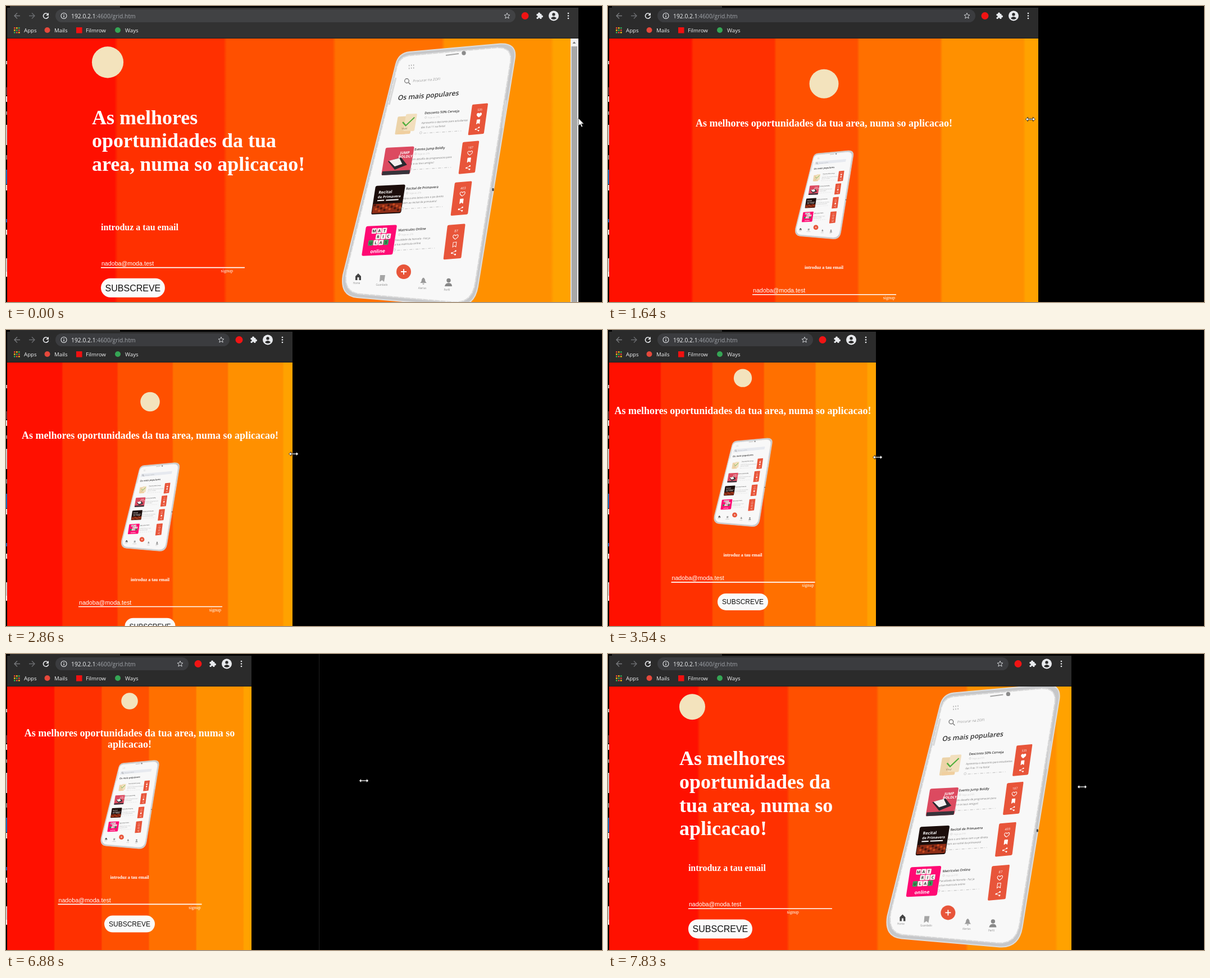
Animation of 1061 by 528 pixels, one loop 8 s. Source, as an HTML page with a canvas:

```html
<!DOCTYPE html>
<html lang="pt">
<head>
<meta charset="utf-8">
<title>Responsive page</title>
<style>
html, body { margin: 0; width: 100%; height: 100%; overflow: hidden; background: #000; }
canvas { display: block; }
</style>
</head>
<body>
<canvas id="stage" width="1061" height="528"></canvas>
<script>
const ctx = document.getElementById('stage').getContext('2d');
const LOOP = 8000, H = 528, FULL = 1003;
const SERIF = '"Liberation Serif", "Times New Roman", serif';
const SANS = '"Liberation Sans", Arial, sans-serif';
const UI = '"Open Sans", sans-serif';
const TITLE = 'As melhores oportunidades da tua area, numa so aplicacao!';
const RED = '#e8553a';

// time, window edge, pointer x, pointer y, page width (edge - 2 when left out)
const steps = [
  [0, 1019, 1019, 200, FULL], [150, 1019, 1020, 200, FULL], [310, 1019, 1021, 200, FULL],
  [860, 1019, 1012, 200, FULL], [1030, 985, 976, 201, FULL], [1320, 888, 876, 201, 912],
  [1450, 858, 845, 201, 870], [1640, 766, 752, 202], [1850, 730, 722, 202],
  [1980, 692, 684, 203], [2100, 650, 644, 203, 646], [2270, 612, 603, 205, 614],
  [2470, 570, 568, 210], [2670, 526, 524, 216], [2860, 510, 512, 221],
  [2980, 494, 499, 224], [3130, 484, 492, 226, 478], [3390, 478, 480, 227],
  [3540, 477, 480, 227], [5780, 459, 442, 228, 473], [5910, 445, 405, 229, 460],
  [6040, 437, 373, 229], [6190, 437, 348, 229], [6340, 437, 332, 229],
  [6610, 437, 383, 229], [6750, 437, 500, 228], [6880, 437, 637, 226],
  [7000, 557, 717, 229], [7140, 717, 782, 232], [7270, 790, 822, 235],
  [7440, 825, 827, 237], [7830, 825, 844, 237]
];

const items = [
  { title: 'Desconto 50% Cerveja', n: '535', text: ['Apresenta o desconto para estudantes', 'das 9 as 11 na festa!'], x: 697, y: 190, liked: true },
  { title: 'Evento Jump Boldly', n: '187', text: ['Um desafio de programacao para', 'ti e os teus amigos!'], x: 676, y: 253 },
  { title: 'Recital de Primavera', n: '403', text: ['Abre o ano letivo com o pe direito', 'Vem ao recital da primavera!'], x: 658, y: 321 },
  { title: 'Matriculas Online', n: '87', text: ['Faculdade de Norvela - Faz ja', 'a tua matricula online'], x: 641, y: 393 }
];

function rect(x, y, w, h, color, r = 0) {
  ctx.fillStyle = color;
  ctx.beginPath();
  ctx.roundRect(x, y, w, h, r);
  ctx.fill();
}

function disc(x, y, r, color) {
  ctx.fillStyle = color;
  ctx.beginPath();
  ctx.arc(x, y, r, 0, 7);
  ctx.fill();
}

function ring(x, y, r, color, width = 1) {
  ctx.beginPath();
  ctx.arc(x, y, r, 0, 7);
  ctx.strokeStyle = color;
  ctx.lineWidth = width;
  ctx.stroke();
}

function shape(d, fill, stroke, width = 1) {
  const p = new Path2D(d);
  if (fill) { ctx.fillStyle = fill; ctx.fill(p); }
  if (stroke) { ctx.strokeStyle = stroke; ctx.lineWidth = width; ctx.stroke(p); }
}

function text(s, x, y, font, color, align = 'left') {
  ctx.font = font;
  ctx.fillStyle = color;
  ctx.textAlign = align;
  ctx.fillText(s, x, y);
}

// Draws in a shifted, optionally slanted or scaled frame.
function at(x, y, draw, a = 1, b = 0, c = 0, d = a) {
  ctx.save();
  ctx.transform(a, b, c, d, x, y);
  draw();
  ctx.restore();
}

function wrap(s, font, width) {
  ctx.font = font;
  const lines = [];
  let line = '';
  for (const word of s.split(' ')) {
    const next = line ? line + ' ' + word : word;
    if (line && ctx.measureText(next).width > width) { lines.push(line); line = word; }
    else line = next;
  }
  return [...lines, line];
}

function toolbar(edge, lit) {
  const bar = lit ? '#323232' : '#2b2b2b', icon = '#e8eaed';
  rect(2, 3, edge, 55, bar);
  rect(7, 0, 196, 4, bar);
  rect(2, 57, edge, 1, '#1c1c1c');
  const arrow = 'M5 0H-5M0 -5L-5 0L0 5';
  at(20, 17.5, () => shape(arrow, null, '#77797c', 1.4));
  at(46, 17.5, () => shape(arrow, null, '#6a6c6f', 1.4), -1, 0, 0, 1);
  at(71, 17.5, () => {
    shape('M3.6 -2.8A4.6 4.6 0 1 0 4.6 1', null, icon, 1.6);
    shape('M5 -5.5V-.5H0Z', icon);
  });
  rect(88, 6, edge - 200, 23, lit ? '#414244' : '#3b3c3f', 11.5);
  ring(103, 17.5, 5, icon, 1.1);
  rect(102.4, 17, 1.3, 3.5, icon);
  rect(102.4, 14.6, 1.3, 1.3, icon);
  text('192.0.2.1', 116, 21.5, '10.3px ' + UI, '#f1f3f4');
  text(':4600/grid.htm', 116 + ctx.measureText('192.0.2.1').width, 21.5, '10.3px ' + UI, '#a0a4a9');

  at(edge - 127, 17.5, () => shape('M0 -5L1.5 -1.6L5 -1.4L2.3 1L3.2 4.6L0 2.6L-3.2 4.6L-2.3 1L-5 -1.4L-1.5 -1.6Z', null, '#d0d2d5'));
  disc(edge - 95, 17.5, 6.5, '#f01414');
  at(edge - 69, 17.5, () => {
    rect(-5.5, -3.5, 9, 9, icon, 1);
    disc(-1, -4, 2, icon);
    disc(4, 1, 2, icon);
    disc(-5, 1.2, 1.6, bar);
    disc(-1, 5.2, 1.6, bar);
  });
  at(edge - 44, 17.5, () => {
    disc(0, 0, 9, icon);
    disc(0, -2.6, 2.7, bar);
    shape('M-5.2 4.2Q0 -1 5.2 4.2Q0 9 -5.2 4.2Z', bar);
  });
  for (const y of [13, 17.5, 22]) disc(edge - 18, y, 1.3, icon);

  const dots = ['#e94435', '#f5b912', '#35a853'];
  for (let i = 0; i < 9; i++) rect(14 + i % 3 * 4, 38 + (i / 3 | 0) * 4, 2.6, 2.6, dots[(i + (i / 3 | 0)) % 3]);
  disc(73.5, 43, 5, '#e5483b');
  rect(125, 38, 10.5, 10.5, '#f01010');
  disc(199, 43, 5, '#35a555');
  [['Apps', 32], ['Mails', 86], ['Filmrow', 142], ['Ways', 212]]
    .forEach(([s, x]) => text(s, x, 46.5, '9.7px ' + UI, '#f1f3f4'));
}

function thumb(i) {
  if (i === 0) {
    rect(2, 8, 20, 34, '#ecd3a8', 2);
    rect(17, 4, 21, 33, '#f2dfbd', 2);
    rect(6, 36, 25, 6, '#f0cf9f', 2);
    shape('M13 19L20 26L34 11', null, '#4fae3c', 2.4);
    text('Viva!', 13, 33, '5px ' + UI, '#8a7455');
    return;
  }
  rect(0, 0, 52, 50, ['', '#dc4a60', '#1b0d0b', '#ff0a74'][i], 3);
  if (i === 1) {
    shape('M8 25L31 19L44 33L23 41Z', '#292a30');
    shape('M10 24L28 20L35 31L22 35Z', '#f4f1f1');
    shape('M1 43H51V50H1Z', '#36333a');
    text('JUMP', 28, 13, 'bold 6.5px ' + UI, '#fff');
    text('BOLDLY', 26, 20, 'bold 6.5px ' + UI, '#fff');
  } else if (i === 2) {
    rect(1, 32, 50, 16, '#8e2d16');
    for (let k = 0; k < 16; k++) disc(4 + k * 3, 34 + k * 7 % 11, 2, k % 2 ? '#c84c20' : '#4b170e');
    text('Recital', 7, 14, 'bold 7px ' + UI, '#fff');
    text('de Primavera', 7, 22, 'bold 6px ' + UI, '#fff');
    rect(7, 25, 12, 2, '#fff');
    rect(22, 25, 22, 2, '#fff');
  } else {
    [...'MATRICULAS'].forEach((c, k) => {
      const row = k < 3 ? 0 : k < 6 ? 1 : 2, col = k - row * 3;
      const x = [11, 19, 8][row] + col * 8.6, y = 4 + row * 10;
      rect(x, y, 8, 9, k === 6 || k === 9 ? '#36a35b' : '#f5f5f0', 1);
      text(c, x + 4, y + 7, 'bold 6.5px ' + UI, '#333', 'center');
    });
    text('online', 26, 46, 'bold 8px ' + UI, '#fff', 'center');
  }
}

function badge(item) {
  rect(0, 0, 30, 58, RED, 2);
  text(item.n, 16, 13, '5.5px ' + UI, '#fff', 'center');
  const heart = 'M0 4C-8 -1 -3 -6 0 -2C3 -6 8 -1 0 4Z';
  at(16, 21, () => shape(heart, item.liked && '#fff', '#fff'));
  at(16, 34, () => shape('M-2.7 -4H2.7V4L0 2L-2.7 4Z', item.n !== '87' && '#fff', '#fff', .9));
  at(16, 48, () => {
    shape('M3 -3L-3 0L3 3', null, '#fff', .8);
    disc(3, -3, 1.4, '#fff');
    disc(-3, 0, 1.4, '#fff');
    disc(3, 3, 1.4, '#fff');
  });
}

function row(item, i) {
  const s = .94 + .04 * i;
  at(item.x, item.y, () => thumb(i), s, -.05, -.16);
  at(item.x + 133 + 4 * i, item.y - 14 + 4 * i, () => badge(item), s, -.09, -.13);
  at(item.x + 48 + 3 * i, item.y + 3 + 2 * i, () => {
    text(item.title, 0, 0, '600 5.8px ' + UI, '#333');
    ring(3, 6, 1.6, '#bbb', .5);
    text('hoje as 21h', 7, 8, '4px ' + UI, '#c4c4c4');
    item.text.forEach((s, k) => text(s, -3, 17 + k * 8, '4.6px ' + UI, '#777'));
    ring(-2, 33, 2, '#aaa', .5);
    ctx.setLineDash([5, 2, 1, 3]);
    shape('M3 34H70', null, '#c8c8c8', 1.2);
    ctx.setLineDash([]);
  }, 1, -.06, -.14);
}

const BODY = 'M718 82L880 67.5Q909 66 906 92L840 500Q834 537 800 535L625 520Q594 517 600 480L694 104Q699 84 718 82Z';

function phone(x, y, scale) {
  at(x, y, () => {
    ctx.translate(-598, -67);
    shape(BODY, '#c6c7c9', '#dedede', 2);
    at(751, 301, () => {
      ctx.translate(-752, -301);
      shape(BODY, '#f8f8f8', '#ececec', 2);
      ctx.setLineDash([9, 2]);
      shape(BODY, null, '#cfcfcf', 1);
      ctx.setLineDash([]);
    }, .955, 0, 0, .97);
    shape('M890 168L884 218M694 128L682 176', null, '#d9d9d9', 3);
    rect(865.5, 325, 3, 5, '#444', 1);
    shape('M783 88L806 85', null, '#a5a5a5', 2);
    disc(815, 84, 3.7, '#8b8b8b');
    for (let k = 0; k < 6; k++) rect(717 + k % 3 * 4, 105 + (k / 3 | 0) * 5 - k % 3 * .4, 1.3, 2.5, '#aaa');
    if (scale < 1) shape('M705 126L868 112L865 126L700 143Z', '#e6e9ef');
    ring(713.5, 133.5, 3.8, '#666', 1.2);
    shape('M716.5 136.5L720 140', null, '#666', 1.3);
    at(724, 136, () => text('Procurar na ZOFI', 0, 0, '6.2px ' + UI, '#999'), 1, -.08, -.16);
    at(697, 168, () => text('Os mais populares', 0, 0, '600 12.2px ' + UI, '#303030'), 1, -.08, -.2);
    items.forEach(row);

    at(627, 483, () => shape('M-5 6V-1L0 -6L5 -1V6H1.5V1H-1.5V6Z', '#444'));
    at(670, 486, () => shape('M-4 -6H5L3 6L-.5 3L-5 6Z', '#a5a5a5'));
    disc(708, 474, 13, RED);
    shape('M703 474H713M708 469V479', null, '#fff', 1.8);
    at(743, 490, () => shape('M-6 4Q-3 2 -3 -2Q0 -9 3 -2Q3 2 6 4ZM-2 5H2L0 7Z', '#999'));
    disc(788, 489.5, 3.7, '#888');
    shape('M781 500Q782 494 788 494T794 500Z', '#888');
    [['Home', 624, 496], ['Guardado', 669, 499], ['Alertas', 741, 505], ['Perfil', 785, 508]]
      .forEach(([s, px, py]) => text(s, px, py, '4.5px ' + UI, '#8d8d8d', 'center'));
  }, scale);
}

function form(x, y, signEnd) {
  text('nadoba@moda.test', x + 1, y - 3, '10.67px ' + SANS, '#fff');
  rect(x, y, 256, 1.7, '#fff');
  text('signup', signEnd, y + 9.5, '8px ' + SERIF, '#fff', 'right');
}

function button(x, y, w, h, size) {
  rect(x, y, w, h, '#fafafa', h / 2);
  text('SUBSCREVE', x + w / 2, y + h / 2 + size * .37, size + 'px ' + SANS, '#111', 'center');
}

function logo(x, y, w, h) {
  disc(x + w / 2, y + h / 2, w / 2, '#f3e3bd');
}

function wide(P) {
  const left = 8 + .1445 * P, h = .0685 * P, base = 142 + h, d = P - FULL;
  const font = 'bold 36px ' + SERIF;
  logo(left, 66, .056 * P, h);
  wrap(TITLE, font, .39 * P).forEach((s, i) => text(s, left, base + i * 41.6, font, '#fff'));
  text('introduz a tau email', left + 16, base + 189, 'bold 16px ' + SERIF, '#fff');
  form(left + 16, base + 255, left + 251 + .212 * d);
  button(left + 16, base + 275, 114, 34, 16);
  phone(598 + .57 * d, 67 + .07 * d, 1);
}

function narrow(P) {
  const mid = 2 + P / 2, top = P > 480 ? 107 : 66, w = .068 * P, h = .083 * P;
  const base = top + h + 44.5, font = 'bold 18px ' + SERIF;
  logo(mid + .5 - w / 2, top, w, h);
  wrap(TITLE, font, P - 10).forEach((s, i) => text(s, mid + .5, base + i * 20.7, font, '#fff', 'center'));
  phone(mid - 51, base + 43, 1 / 2.97);
  text('introduz a tau email', mid + .5, base + 254, 'bold 8px ' + SERIF, '#fff', 'center');
  form(mid - 127, base + 299, mid + 127);
  button(mid - 44.5, base + 320, 90, 30, 12);
}

function page(P) {
  const g = ctx.createLinearGradient(2, 0, 2 + P, 0);
  const green = [16, 48, 80, 112, 144, 162];
  green.forEach((v, i) => {
    const color = `rgb(255,${v},0)`;
    g.addColorStop(i ? i * .1935 + .003 : 0, color);
    g.addColorStop(i < 5 ? (i + 1) * .1935 - .003 : 1, color);
  });
  rect(2, 58, P, H - 58, g);
  (P > 794 ? wide : narrow)(P);
}

function scrollbar(hover) {
  rect(1005, 58, 14, H - 58, '#f1f1f1');
  shape('M1008.5 67L1011.5 63.5L1014.5 67Z', '#777');
  rect(1006.5, 72, 10.5, H - 72, hover ? '#a8a8a8' : '#c1c1c1');
}

function pointer(x, y, arrow) {
  at(x, y, () => {
    if (arrow) shape('M0 0V14L3.2 11L5.5 16L7.7 15L5.5 10.2H9.8Z', '#fff', '#000', .7);
    else shape('M-8.5 0L-4.5 -3.7V-1H4.5V-3.7L8.5 0L4.5 3.7V1H-4.5V3.7Z', '#fff', '#000', .8);
  });
}

// Slivers of the window behind, along the left side.
function backdrop() {
  rect(0, 0, 1061, H, '#000');
  [[98, 6, '#bbb'], [145, 14, '#5a3035'], [161, 10, '#ddd'], [188, 6, '#888'], [212, 36, '#c9c9c9'],
   [266, 8, '#777'], [292, 26, '#1769b5'], [319, 10, '#ddd'], [380, 6, '#1c5fae'], [399, 9, '#ddd'],
   [450, 25, '#ccc'], [474, 9, '#eee']].forEach(([y, h, c]) => rect(0, y, 2, h, c));
}

function draw(now) {
  const t = now % LOOP;
  const [start, edge, x, y, P = edge - 2] = steps.findLast(s => s[0] <= t);
  backdrop();
  if (start === 6880) rect(557, 0, 1, H, '#1e1e1e');
  ctx.save();
  ctx.beginPath();
  ctx.rect(0, 0, edge, H);
  ctx.clip();
  rect(2, 58, edge, H - 58, '#fff');
  toolbar(Math.min(P === FULL ? 1019 : P + 2, edge + 20), t < 860);
  ctx.save();
  ctx.beginPath();
  ctx.rect(2, 58, edge, H - 58);
  ctx.clip();
  page(P);
  if (P === FULL) scrollbar(t < 150);
  ctx.restore();
  ctx.restore();
  pointer(x, y, t < 150);
}

const began = performance.now();
function tick() {
  draw(performance.now() - began);
  requestAnimationFrame(tick);
}
tick();
</script>
</body>
</html>
```
